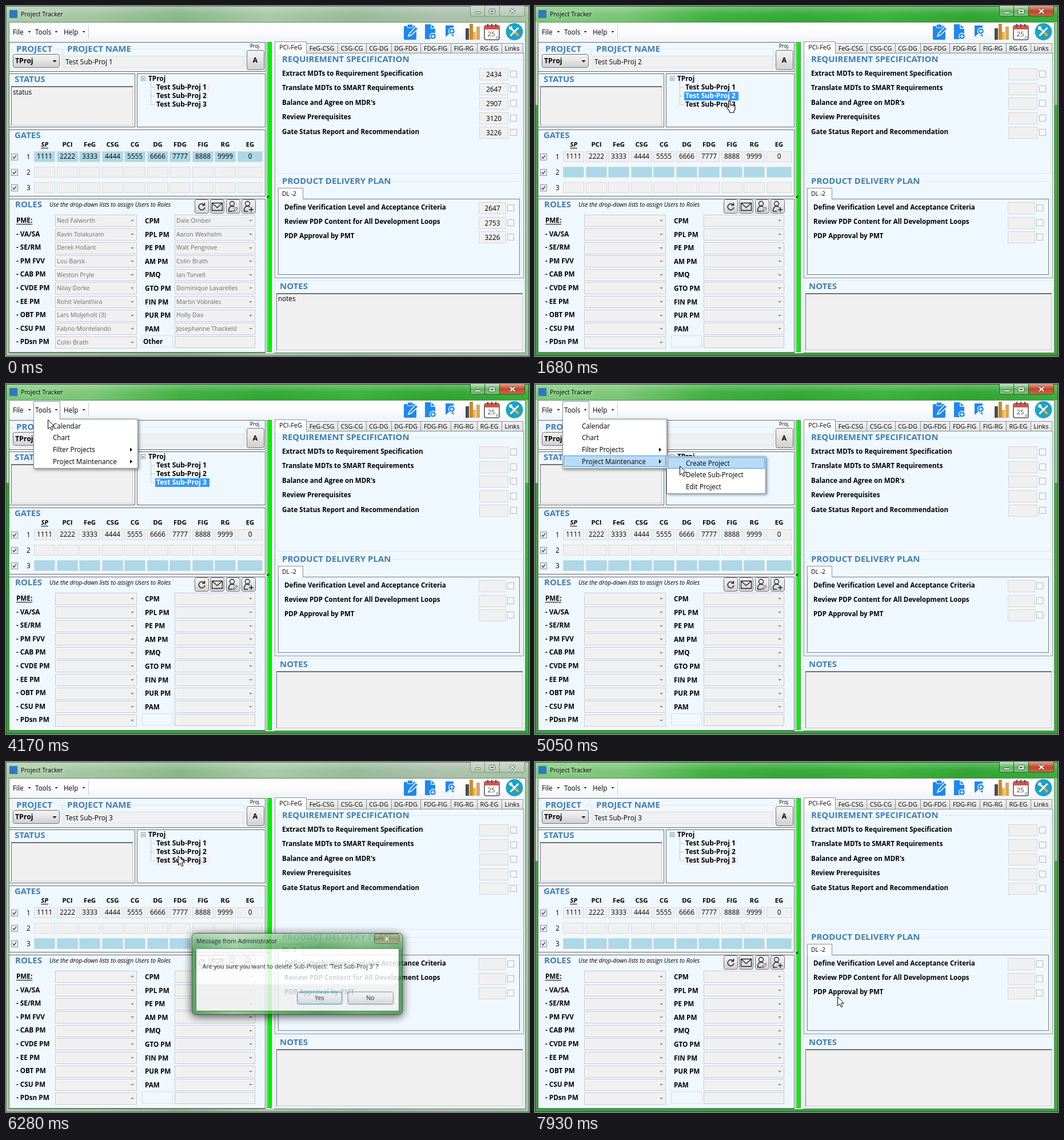
Recreate the animation shown at these times as an HTML page with a canvas. Size 915 by 612 pixels, loop 8000 ms.

```html
<!DOCTYPE html>
<html lang="en">
<head>
<meta charset="utf-8">
<title>Project Tracker</title>
<style>
html, body { margin: 0; width: 100%; height: 100%; overflow: hidden }
canvas { display: block }
</style>
</head>
<body>
<canvas id="stage" width="915" height="612"></canvas>
<script>
const screen2d = document.getElementById('stage').getContext('2d');
const layer = document.createElement('canvas');
layer.width = 915;
layer.height = 612;
const layer2d = layer.getContext('2d');
let g = screen2d; // current drawing context

const LOOP = 8000;
const ALICE = '#f0f8ff', GRAY = '#f0f0f0', HEAD = '#3f7fb5', CELL = '#add8e6';

// ---------- helpers ----------
function text(s, x, y, size = 11.7, { color = '#000', style = '', align = 'left', under = false } = {}) {
  g.font = `${style} ${size}px "Open Sans", "Noto Sans", sans-serif`;
  g.textAlign = align;
  g.fillStyle = color;
  g.fillText(s, x, y + size * 0.36);
  if (under) {
    const w = g.measureText(s).width;
    g.fillRect(align === 'center' ? x - w / 2 : x, Math.round(y + size * 0.5), w, 1);
  }
}
const bold = (s, x, y, size = 11.7, opt = {}) => text(s, x, y, size, { style: 'bold', ...opt });
const heading = (s, x, y) => bold(s, x, y, 15, { color: HEAD });

function box(x, y, w, h, fill, stroke) {
  if (fill) { g.fillStyle = fill; g.fillRect(x, y, w, h); }
  if (stroke) { g.strokeStyle = stroke; g.lineWidth = 1; g.strokeRect(x + .5, y + .5, w - 1, h - 1); }
}
function paint(p, fill, stroke, lw) {
  if (fill) { g.fillStyle = fill; g.fill(p); }
  if (stroke) { g.strokeStyle = stroke; g.lineWidth = lw; g.stroke(p); }
}
function round(x, y, w, h, r, fill, stroke, lw = 1) {
  const p = new Path2D();
  p.roundRect(x, y, w, h, r);
  paint(p, fill, stroke, lw);
}
function disc(x, y, r, fill, stroke, lw = 1) {
  const p = new Path2D();
  p.arc(x, y, r, 0, 7);
  paint(p, fill, stroke, lw);
}
function path(d, x, y, fill, stroke, lw = 1) {
  g.save();
  g.translate(x, y);
  paint(new Path2D(d), fill, stroke, lw);
  g.restore();
}
function gradient(x0, y0, x1, y1, ...colors) {
  const grad = g.createLinearGradient(x0, y0, x1, y1);
  colors.forEach((c, i) => grad.addColorStop(i / (colors.length - 1), c));
  return grad;
}
const down = (x, y, color = '#000', r = 3) => path(`M${-r} 0H${r}L0 ${r}Z`, x, y, color);
const groupBox = (x, y, w, h) => box(x, y, w, h, null, '#dfe5ea');

function panel(x, y, w, h) {
  box(x, y, w, h, ALICE, '#5f6468');
  box(x + 1, y + 1, w - 2, h - 2, null, '#fff');
}
function sunken(x, y, w, h) {
  box(x, y, w, h, GRAY, '#c8c8c8');
  box(x, y, w, 2, '#707070');
  box(x, y, 1, h, '#707070');
}
function check(x, y, on) {
  box(x, y, 12, 12, on ? '#f4f4f4' : '#f8f8f8', on ? '#8e8f8f' : '#b4b7ba');
  if (on) path('M3 5.5L5 8.5 9 3', x, y, null, '#4b5c8c', 1.7);
}
function button(x, y, w, h, border = '#707070') {
  round(x + .5, y + .5, w - 1, h - 1, 3, gradient(0, y, 0, y + h, '#f3f3f3', '#ebebeb', '#dcdcdc', '#cfcfcf'), border);
}

// ---------- data ----------
const gates = ['SP', 'PCI', 'FeG', 'CSG', 'CG', 'DG', 'FDG', 'FIG', 'RG', 'EG'];
const leftRoles = ['PME:', '- VA/SA', '- SE/RM', '- PM FVV', '- CAB PM', '- CVDE PM', '- EE PM', '- OBT PM', '- CSU PM', '- PDsn PM'];
const rightRoles = ['CPM', 'PPL PM', 'PE PM', 'AM PM', 'PMQ', 'GTO PM', 'FIN PM', 'PUR PM', 'PAM'];
const leftUsers = ['Ned Falworth', 'Ravin Tolakuram', 'Derek Hollant', 'Lou Barsk', 'Weston Pryle', 'Nilay Dorke',
  'Rohit Velanthira', 'Lars Midjeholt (3)', 'Fabrio Montelando', 'Colin Brath'];
const rightUsers = ['Dale Omber', 'Aaron Wexholm', 'Walt Pengrove', 'Colin Brath', 'Ian Torvell', 'Dominique Lavarelles',
  'Martin Vobralec', 'Holly Dax', 'Josephanne Thackeld'];
const tabs = [['FeG-CSG', 525], ['CSG-CG', 580], ['CG-DG', 630], ['DG-FDG', 674], ['FDG-FIG', 725], ['FIG-RG', 778],
  ['RG-EG', 824], ['Links', 867], ['', 904]];
const specs = [['Extract MDTs to Requirement Specification', 2434], ['Translate MDTs to SMART Requirements', 2647],
  ["Balance and Agree on MDR's", 2907], ['Review Prerequisites', 3120], ['Gate Status Report and Recommendation', 3226]];
const plans = [['Define Verification Level and Acceptance Criteria', 2647], ['Review PDP Content for All Development Loops', 2753],
  ['PDP Approval by PMT', 3226]];

// ---------- window ----------
function frame(active) {
  box(0, 0, 915, 612, active
    ? gradient(0, 0, 915, 0, '#7cc878', '#78c474', '#3cae3c', '#2fa632', '#38b038', '#2ca22e', '#37ad37')
    : gradient(0, 0, 915, 0, '#a9cba7', '#a2c39f', '#86b487', '#a8c8a7', '#94b996', '#abbfac', '#a2c3a2'));
  box(0, 0, 915, 28, gradient(0, 0, 0, 28, 'rgba(255,255,255,.3)', 'rgba(255,255,255,.05)', 'rgba(255,255,255,0)'));
  if (active) {
    box(0, 28, 5, 145, 'rgba(255,255,255,.4)');
    box(0, 173, 5, 439, '#30a434');
    box(0, 606, 915, 6, '#30a434');
    box(909, 28, 6, 145, 'rgba(255,255,255,.4)');
  }
  box(0, 0, 915, 612, null, active ? '#1e5a22' : '#5d7a60');
  box(6, 7, 14, 14, '#2f78c0');
  g.save();
  g.shadowColor = 'rgba(255,255,255,.9)';
  g.shadowBlur = 8;
  text('Project Tracker', 26, 14, 10.7);
  g.restore();

  const glass = active ? gradient(0, 0, 0, 18, '#c3e6c0', '#63b562', '#7cc97a') : gradient(0, 0, 0, 18, '#cddccd', '#b4c9b5');
  const edge = active ? '#245c28' : '#7c917e', ink = active ? '#fff' : '#f6f8f6', rim = '#4b5a4c';
  round(812.5, -4, 25, 22, 3, glass, edge);
  round(837.5, -4, 26, 22, 0, glass, edge);
  round(863.5, -4, 44, 22, 3, active ? gradient(0, 0, 0, 18, '#e3a08c', '#c0452c', '#cf6a48') : glass, edge);
  round(820.5, 10.5, 10, 3, 1, ink, rim);
  round(845.5, 5.5, 10, 8, 1, ink, rim);
  box(848, 8, 5, 3, active ? '#63b562' : '#b4c9b5', rim);
  const cross = 'M-4-3.5L4 3.5M4-3.5L-4 3.5';
  path(cross, 886, 9, null, rim, 4);
  path(cross, 886, 9, null, ink, 2.2);

  box(5, 28, 904, 579, ALICE, '#6f8a72');
  box(6, 29, 902, 32, gradient(0, 29, 0, 61, '#fff', '#fdfdfe', '#f0f3f8'));
}

function menuTitle(s, x, arrow) {
  text(s, x, 46);
  down(arrow, 44, '#000', 2.5);
}
function toolbar() {
  menuTitle('File', 12, 41);
  menuTitle('Tools', 51, 88);
  menuTitle('Help', 101, 136);
  box(144, 33, 1, 24, '#c5c9d0');
  const blue = '#1e88f0';
  // clipboard with pencil
  round(696, 35, 22, 24, 2, blue);
  round(702, 32, 10, 6, 2, blue, '#fff');
  path('M-8 8L-6 3 5-9 9-5-3 6Z', 712, 45, blue, '#fff', 1.5);
  // page
  path('M0 0H11L18 7V26H0Z', 733, 32, blue);
  path('M11 0V7H18', 733, 32, null, '#fff', 1.3);
  // bookmark
  path('M0 0H14V20L7 14 0 20Z', 769, 34, blue);
  [[747, 53], [780, 44]].forEach(([x, y]) => {
    disc(x, y, 5.5, blue, '#fff', 1.3);
    path('M-3 0H3M0-3V3', x, y, null, '#fff', 1.4);
  });
  // bar chart
  box(804, 39, 6, 20, '#4a4d50');
  box(811, 31, 6, 28, '#c98b2b');
  box(817, 45, 5, 14, '#f0b94a');
  box(823, 36, 6, 23, '#d9a560');
  // calendar
  round(837, 34, 26, 25, 3, '#fff', '#555', 1.6);
  box(837, 34, 26, 7, '#d9534a');
  [843, 850, 857].forEach(x => box(x - 1, 31, 2, 6, '#555'));
  text('25', 849, 49, 11.5, { align: 'center', color: '#444' });
  path('M20 25L26 19H20Z', 837, 34, '#bbb');
  // wrench and screwdriver
  disc(889.5, 45, 15, '#1ba3c6');
  path('M-7-7L7 7M7-7L-7 7', 889.5, 45, null, '#fff', 3);
  disc(883, 38.5, 3, '#fff');
  path('M1 1L7 7', 889.5, 45, null, '#f0a13c', 4);
}

function projectPanels(selected, shown, focused) {
  panel(5, 63, 449, 52);
  groupBox(10, 75, 88, 36);
  groupBox(99, 75, 319, 36);
  box(16, 70, 70, 12, ALICE);
  box(105, 70, 114, 12, ALICE);
  heading('PROJECT', 18, 75);
  heading('PROJECT NAME', 107, 75);
  button(12, 84, 82, 24);
  bold('TProj', 16, 96, 12.3);
  down(85, 95, '#000', 3.5);
  box(101, 87, 315, 21, GRAY, '#d9dde1');
  text('Test Sub-Proj ' + shown, 104, 98, 12);
  text('Proj.', 427, 70, 8.5);
  button(421, 77, 31, 35);
  bold('A', 436, 95, 12, { align: 'center' });

  panel(5, 118, 221, 94);
  heading('STATUS', 15, 128);
  sunken(9, 140, 213, 69);
  if (shown === 1) text('status', 12, 151);

  panel(229, 118, 225, 94);
  box(236, 123, 8, 8, '#fff', '#8a97a8');
  box(238, 127, 4, 1, '#335');
  bold('TProj', 249, 127, 11.8);
  g.setLineDash([1, 1]);
  path('M.5 0V41M0 10.5H7M0 25.5H7M0 40.5H7', 253, 132, null, '#999');
  g.setLineDash([]);
  for (let i = 1; i <= 3; i++) {
    const y = 127 + 15 * i, on = i === selected;
    if (on) box(261, y - 7, 95, 15, focused ? '#3399ff' : GRAY);
    bold('Test Sub-Proj ' + i, 263, y, 12.1, { color: on && focused ? '#fff' : '#000' });
  }
}

function gatesPanel(shown) {
  panel(5, 216, 449, 117);
  heading('GATES', 15, 226);
  gates.forEach((name, i) => {
    const x = Math.round(49 + 39.5 * i), w = i === 9 ? 44 : 37, cx = x + w / 2;
    bold(name, cx, 242, 11.4, { align: 'center', style: i ? 'bold' : 'italic bold', under: !i });
    for (let r = 0; r < 3; r++)
      box(x, 254 + 27 * r, w, 19, r + 1 === shown ? CELL : GRAY, '#d6dade');
    text(i < 9 ? String(i + 1).repeat(4) : '0', cx, 263, 11.8, { align: 'center' });
  });
  for (let r = 0; r < 3; r++) {
    check(9, 258 + 27 * r, true);
    text(r + 1, 36, 264 + 27 * r);
  }
}

function combo(x, y, w, user, cy) {
  box(x, y, w, 21, GRAY, '#bfc4c9');
  box(x + 1, y + 1, w - 2, 19, null, '#fafafa');
  down(x + w - 8, y + 9, '#8c8c8c');
  if (user) text(user, x + 3, cy, 10.7, { color: '#6d6d6d' });
}
function rolesPanel(full) {
  panel(5, 337, 449, 269);
  heading('ROLES', 16, 347);
  text('Use the drop-down lists to assign Users to Roles', 76, 347, 10.2, { style: 'italic' });
  [330, 357, 385, 412].forEach(x => button(x, 338, 25, 25));
  path('M4.5-3A5.4 5.4 0 1 0 5.4 1M5-7V-2.5H.5', 342.5, 351, null, '#222', 1.5);
  path('M0 0H18V13H0ZM0 0L9 8 18 0', 360.5, 344.5, null, '#222', 1.4);
  [395.5, 422.5].forEach(x => {
    disc(x, 345.5, 4, null, '#222', 1.4);
    path('M-6 9Q-6 0 0 0 3 0 4 2M-6 9H1', x, 350, null, '#222', 1.4);
  });
  path('M0 6L1 3 5-1 7 1 3 5Z', 398, 353, '#fff', '#222');
  path('M-4 0H4M0-4V4', 429, 356, null, '#222', 1.6);

  for (let i = 0; i < 10; i++) {
    const y = 375.3 + 23.6 * i, top = Math.round(y - 10);
    bold(leftRoles[i], 18, y - .5, 11.7, { under: !i });
    combo(86, top, 143, full && leftUsers[i], y);
    if (i < 9) {
      bold(rightRoles[i], 243, y + .5);
      combo(295, top, 141, full && rightUsers[i], y);
    }
  }
  box(238, 576, 54, 21, ALICE, '#d5dde6');
  if (full) bold('Other', 240, 586.5);
  box(295, 577, 141, 21, GRAY, '#c3c7cb');
}

function splitter() {
  box(454, 62, 15, 545, '#eef3f6');
  box(456, 63, 9, 542, '#00f000', '#4d8a50');
  box(457, 64, 1, 540, '#b8ffb8');
  bold('<', 456, 334, 8.5);
}

function taskRow(label, value, x, y, fx, fw, fy, cx, full) {
  fy = Math.round(fy);
  bold(label, x, y, 11.6);
  box(fx, fy, fw, 21, GRAY, '#d3d7db');
  if (full) text(value, fx + fw / 2, fy + 10.5, 11.8, { align: 'center' });
  check(cx, fy + 4, false);
}
function rightSide(full) {
  box(470, 82, 436, 394, ALICE, '#8b9096');
  tabs.slice(0, -1).forEach(([s, x], i) => {
    const w = tabs[i + 1][1] - x;
    box(x, 65, w + 1, 18, gradient(0, 65, 0, 83, '#f4f4f4', '#dedede'), '#8b9096');
    text(s, x + w / 2, 74, 10.8, { align: 'center' });
  });
  box(470, 62, 56, 21, '#fff', '#8b9096');
  box(471, 82, 54, 2, '#fff');
  text('PCI-FeG', 498, 72.5, 10.9, { align: 'center' });

  groupBox(474, 93, 429, 200);
  box(480, 87, 230, 12, ALICE);
  heading('REQUIREMENT SPECIFICATION', 483, 93);
  specs.forEach(([s, n], i) => taskRow(s, n, 483, 117.5 + 25.5 * i, 828, 51, 109 + 25.5 * i, 882, full));

  groupBox(474, 306, 429, 167);
  box(480, 300, 194, 12, ALICE);
  heading('PRODUCT DELIVERY PLAN', 483, 306);
  box(476, 337, 423, 133, ALICE, '#777c82');
  box(476, 318, 44, 20, '#fff', '#8b9096');
  box(477, 337, 42, 1, '#fff');
  text('DL -2', 483, 328, 10.4);
  plans.forEach(([s, n], i) => taskRow(s, n, 487, 351.5 + 25.4 * i, 827, 48, 343 + 25.5 * i, 877, full));

  box(470, 480, 436, 126, ALICE, '#dfe5ea');
  heading('NOTES', 479, 490);
  sunken(473, 502, 431, 100);
  if (full) text('notes', 476, 512);
}

// ---------- overlays ----------
function menu(x, y, w, items, hover, submenus) {
  const step = 20.7, h = items.length * step + 4;
  g.save();
  g.shadowColor = 'rgba(0,0,0,.45)';
  g.shadowBlur = 5;
  g.shadowOffsetX = g.shadowOffsetY = 2;
  box(x, y, w, h, '#fff');
  g.restore();
  box(x, y, w, h, null, '#8a8d91');
  items.forEach((s, i) => {
    const cy = y + 12.3 + step * i;
    if (i === hover) box(x + 2, Math.round(cy - 10), w - 4, 20, '#b9dbf7', '#3399ff');
    text(s, x + 34, cy);
    if (submenus.includes(i)) path('M0-3.5L4 0 0 3.5Z', x + w - 14, cy, '#000');
  });
}
function menus(t, x, y) {
  if (t < 3780 || t >= 5830) return;
  if (t < 3930) {
    box(48, 30, 47, 29, '#b9dbf7', '#3399ff');
  } else {
    const hover = t < 4240 ? -1 : Math.min(3, Math.floor((y - 63) / 20.7));
    menu(48, 61, 183, ['Calendar', 'Chart', 'Filter Projects', 'Project Maintenance'], t < 4650 ? hover : 3, [2, 3]);
    box(48, 30, 47, 32, '#fff', '#8a8d91');
    box(49, 61, 45, 1, '#fff');
  }
  menuTitle('Tools', 51, 88);
  if (t >= 4650)
    menu(230, 126, 174, ['Create Project', 'Delete Sub-Project', 'Edit Project'], x < 231 ? -1 : y < 148 ? 0 : 1, []);
  if (t >= 5510 && t < 5600) {
    box(299, 186, 249, 20, '#fff', '#888');
    text('Delete the selected Sub-Project from the list', 304, 196, 10.4, { color: '#555' });
  }
}

function dialogBody(hover) {
  g.save();
  g.shadowColor = 'rgba(0,0,0,.85)';
  g.shadowBlur = 16;
  g.shadowOffsetY = 3;
  round(322.5, 298.5, 374, 144, 6,
    gradient(322, 0, 697, 0, '#3f9f47', '#8dc78a', '#4fab52', '#2f9238', '#57a85a', '#3c9845'), '#16431b');
  g.restore();
  round(323.5, 299.5, 372, 26, 5, gradient(0, 299, 0, 326, 'rgba(255,255,255,.5)', 'rgba(255,255,255,.05)'), 'rgba(255,255,255,.5)');
  text('Message from Administrator', 330, 312, 10.8);
  round(646.5, 299.5, 44, 17, 3, gradient(0, 299, 0, 316, '#b9bf98', '#7f8a58', '#98a070'), '#44552f');
  path('M-3.5-3L3.5 3M3.5-3L-3.5 3', 669, 308, null, '#eef0e4', 2);
  box(329, 325, 362, 112, GRAY, '#2e6b34');
  box(330, 326, 360, 63, '#fff');
  text("Are you sure you want to delete Sub-Project: 'Test Sub-Proj 3' ?", 341, 357.5, 10.8);
  button(509, 402, 81, 23, '#2f8fc0');
  round(510.5, 403.5, 78, 20, 2, hover && 'rgba(160,215,245,.6)', '#7fd0f2');
  text('Yes', 549, 413, 10.8, { align: 'center' });
  button(599, 402, 82, 23);
  text('No', 639.5, 413, 10.8, { align: 'center' });
}
function dialog(amount, hover) {
  const scale = .95 + .05 * amount;
  g = layer2d;
  g.clearRect(0, 0, 915, 612);
  dialogBody(hover);
  g = screen2d;
  g.save();
  g.globalAlpha = .5 + .5 * amount;
  g.translate(509.5, 370.5);
  g.scale(scale, scale);
  g.drawImage(layer, -509.5, -370.5);
  g.restore();
}

// ---------- pointer: time, x, y ----------
const route = [[290, 822, 594], [360, 822, 594], [370, 625, 435], [520, 625, 435], [530, 376, 230], [640, 376, 230],
  [820, 341, 171], [960, 344, 172], [970, 340, 157], [1480, 340, 157], [1680, 340, 165], [2440, 340, 165], [2520, 336, 169],
  [3260, 336, 170], [3680, 16, 47], [3800, 56, 45], [4000, 66, 49], [4160, 66, 49], [4170, 73, 62], [4240, 73, 62],
  [4650, 113, 137], [4780, 113, 137], [5000, 240, 138], [5220, 297, 160], [5500, 297, 160], [5510, 297, 164], [6170, 297, 164],
  [6180, 301, 164], [6500, 301, 164], [6930, 515, 380], [7000, 526, 395], [7080, 526, 395], [7330, 529, 410], [LOOP, 529, 410]];

function pointerAt(t) {
  const i = route.findIndex(k => k[0] > t);
  if (i < 1) return [route[0][1], route[0][2]];
  const [t0, x0, y0] = route[i - 1], [t1, x1, y1] = route[i];
  const p = (t - t0) / (t1 - t0);
  return [Math.round(x0 + (x1 - x0) * p), Math.round(y0 + (y1 - y0) * p)];
}
function pointer(t, x, y) {
  if (t < 290) return;
  if (t >= 970 && t < 3300)
    path('M5 1.5Q6.5 0 8 1.5V8.5L9 8Q10.5 7.5 11 9 13 8.2 13.5 9.8 16 9.5 16 11.8V15.8L14 18.8V21.3H6.5V19L1.5 12.5Q1 10.5 3 10.7L5 12.5Z', x - 6, y, '#fff', '#000', 1.1);
  else
    path('M.5.5V16.5L4 13 6.5 18.5 9 17.5 6.5 12H11.5Z', x, y, '#fff', '#000');
}

// ---------- timeline ----------
function render(t) {
  const active = t >= 1220 && t < 6040 || t >= 7930;
  const selected = t < 1220 ? 1 : t < 2060 ? 2 : 3;
  const shown = t < 1290 ? 1 : t < 2140 ? 2 : 3;
  const [x, y] = pointerAt(t);
  frame(active);
  toolbar();
  projectPanels(selected, shown, active && t < 6040);
  gatesPanel(shown);
  rolesPanel(shown === 1);
  splitter();
  rightSide(shown === 1);
  menus(t, x, y);
  if (t >= 6180 && t < 7850)
    dialog(t < 7780 ? Math.min(1, (t - 6140) / 210) : .35, t >= 7250);
  pointer(t, x, y);
}

const start = performance.now();
function tick() {
  render((performance.now() - start) % LOOP);
  requestAnimationFrame(tick);
}
tick();
</script>
</body>
</html>
```
